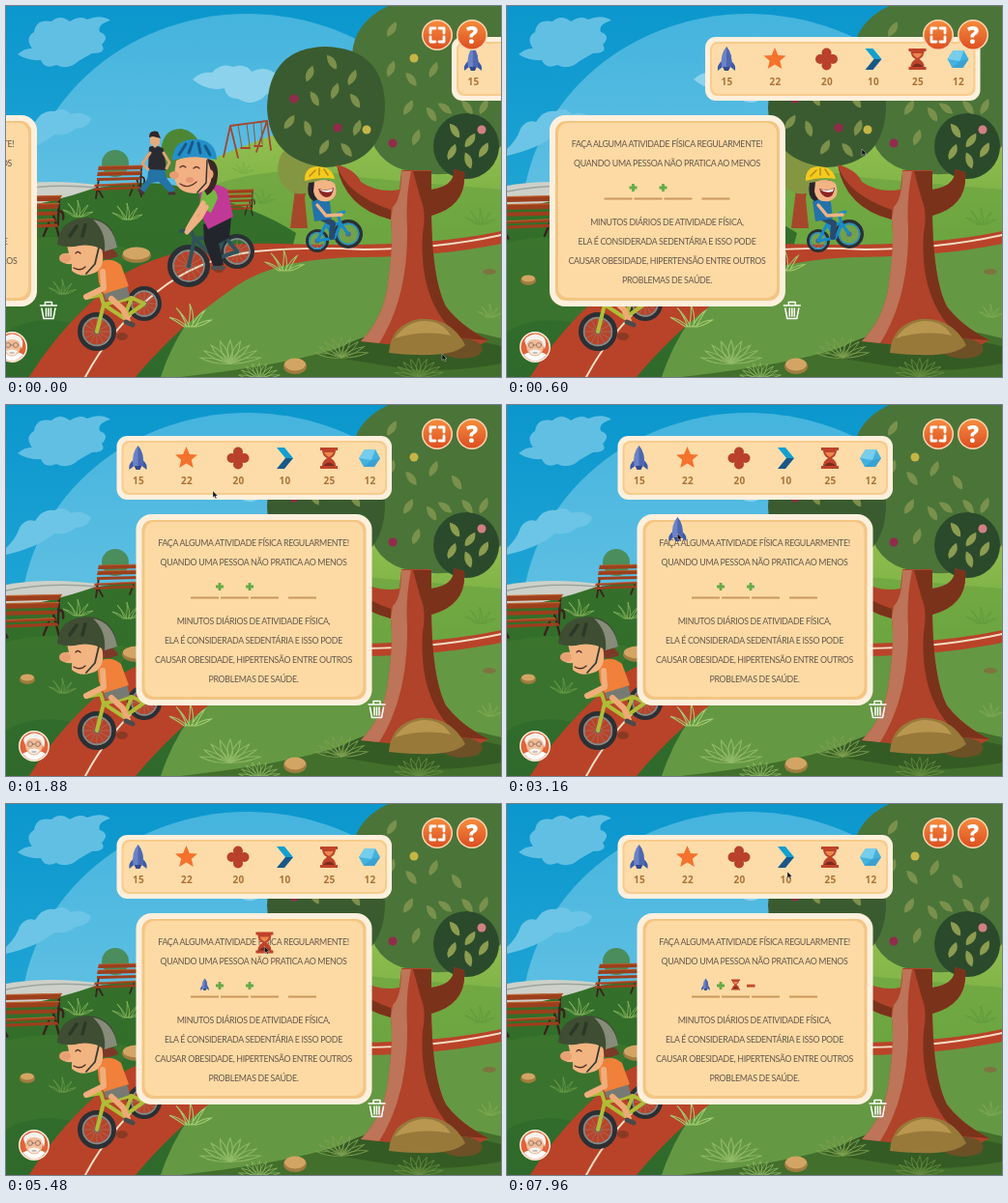
An HTML page that plays this animation: 512x384 px, repeating every 8 s.

```html
<!DOCTYPE html>
<html lang="pt">
<head>
<meta charset="utf-8">
<title>Atividade física</title>
<style>
html, body { margin: 0; width: 100%; height: 100%; overflow: hidden; background: #1095cf; }
svg { display: block; width: 100vw; height: 100vh; }
.copy { font: 8.8px Lato, sans-serif; letter-spacing: -.32px; fill: #66564c; text-anchor: middle; }
.count { font: 700 10px "Open Sans", sans-serif; letter-spacing: .3px; fill: #ad7236; text-anchor: middle; }
.line { fill: none; stroke-linecap: round; stroke-linejoin: round; }
</style>
</head>
<body>
<svg viewBox="0 0 512 384" preserveAspectRatio="none">
<defs>
  <linearGradient id="sky" x2="0" y2="1"><stop stop-color="#0b97cd"/><stop offset="1" stop-color="#22a5d6"/></linearGradient>
  <linearGradient id="glow" x2="0" y2="1"><stop stop-color="#45b4de"/><stop offset=".5" stop-color="#62c1e3"/></linearGradient>
  <linearGradient id="hill" x2="0" y2="1"><stop stop-color="#9cc652"/><stop offset="1" stop-color="#6ba540"/></linearGradient>
  <linearGradient id="field" x2="0" y2="1"><stop stop-color="#34702a"/><stop offset="1" stop-color="#2f6a2c"/></linearGradient>
  <linearGradient id="orange" x2="0" y2="1"><stop stop-color="#f58b3c"/><stop offset="1" stop-color="#dd4f22"/></linearGradient>
  <g id="bench">
    <path class="line" d="M6 15 3 35M45 14 50 33M50 3 49 24M4 23 10 34M42 22 38 32M49 13Q54 12 53 19" stroke="#3a231d" stroke-width="1.8"/>
    <path d="M6 2 52 1 50 5 5 6ZM5 8 50 7 49 11 4 12ZM4 14 49 13 48 16 4 17ZM2 21 46 19 48 21 1 23ZM1 24.5 48 22.5 50 25 0 27Z" fill="#9c3f1d"/>
    <path class="line" d="M6 2 52 1M5 8 50 7M2 21 46 19" stroke="#bd5f2d" stroke-width=".8"/>
  </g>
  <path id="tuft" d="M-2 0Q-8-6-15-7Q-8-3-4 0ZM-2 0Q-6-10-10-14Q-4-8 0 0ZM-1 0Q1-12 0-17Q4-8 2 0ZM1 0Q7-10 11-12Q6-4 4 0ZM3 0Q10-5 16-5Q10-1 5 0Z"/>
  <g id="rocket">
    <path d="M-5 2Q-10 6-9 12L-4 8ZM5 2Q10 6 9 12L4 8Z" fill="#3c59a6"/>
    <path d="M0-13Q-7-5-5 8H5Q7-5 0-13Z" fill="#6a83c6"/><path d="M0-13Q7-5 5 8H0Z" fill="#4f66b0"/>
    <path d="M-4 8H4L2 12H-2Z" fill="#34488c"/>
  </g>
  <path id="star" d="M0-12 3.4-4 11.5-3.6 5.3 1.8 7.3 10 0 5.5-7.3 10-5.3 1.8-11.5-3.6-3.4-4Z" fill="#f5722c"/>
  <g id="clover" fill="#b9412b"><circle cy="-6.5" r="5"/><circle cx="-6.5" r="5"/><circle cx="6.5" r="5"/><circle cy="6.5" r="5"/><path d="M-4.5-4.5H4.5V4.5H-4.5Z"/></g>
  <g id="arrow"><path d="M-8-11H0L9 0H1Z" fill="#11a0d0"/><path d="M-8 11H0L9 0H1Z" fill="#175889"/></g>
  <g id="glass"><path d="M-9-11H9V-8H7Q7-3 2 0Q7 3 7 8H9V11H-9V8H-7Q-7 3-2 0Q-7-3-7-8H-9Z" fill="#bf432a"/><path d="M-5-6H5Q3-2 0-1Q-3-2-5-6Z" fill="#e9894f"/><path d="M-6 8Q0 1 6 8Z" fill="#792b21"/></g>
  <g id="gem"><path d="M-5-9H6L11 0 5 9H-6L-11 0Z" fill="#43b2de"/><path d="M-5-9H6L2 2-11 0Z" fill="#77cdec"/><path d="M2 2 11 0 5 9-6 9Z" fill="#3aa2d2"/></g>
  <path id="plus" d="M-1.4-4H1.4V-1.4H4V1.4H1.4V4H-1.4V1.4H-4V-1.4H-1.4Z" fill="#65ab48"/>
</defs>

<path fill="url(#sky)" d="M0 0H512V220H0Z"/>
<ellipse cx="250" cy="225" rx="235" ry="217" fill="url(#glow)"/>
<g fill="#62bfe4">
  <path d="M12 50Q20 43 27 44Q19 33 29 27Q31 13 47 16Q56 8 66 16Q77 9 84 14Q98 8 108 15Q94 19 97 27Q108 31 99 40Q105 49 89 49Q80 54 75 57Q64 67 52 61Q40 66 36 56Q23 57 12 50Z"/>
  <path d="M0 148Q10 139 14 127Q20 117 30 120Q38 107 50 109Q60 104 67 112Q78 108 88 116Q86 126 72 127Q64 135 50 133Q34 147 0 155Z" fill="#6cc5e6"/>
  <path d="M193 76Q202 67 213 69Q222 58 235 63Q248 59 254 68Q268 61 280 71Q297 66 310 76Q301 83 288 82Q283 94 270 91Q256 106 240 96Q228 96 226 85Q208 89 193 76Z" fill="#8cd2ec"/>
</g>

<path d="M0 186Q45 178 100 186L70 202 0 214Z" fill="#cdd1c9"/>
<path class="line" d="M0 192Q45 183 94 188" stroke="#9da69e" stroke-width="1.5"/>
<circle cx="113" cy="163" r="14" fill="#4b8d5c"/>
<path d="M160 155Q160 127 181 127Q202 130 204 160L190 178H165Z" fill="#4d8735"/>
<path d="M190 170Q235 147 285 131Q390 88 512 110V260H150Z" fill="url(#hill)"/>
<path d="M210 187Q285 160 372 178L512 190V260H190Z" fill="#6ba441" opacity=".7"/>
<path d="M0 211Q50 203 90 189Q160 175 197 193Q265 211 300 235L260 384H0Z" fill="url(#field)"/>
<path d="M0 245Q60 230 130 252L75 330Q33 318 0 337Z" fill="#40792f" opacity=".6"/>
<path d="M160 384Q190 292 280 256Q410 250 512 241V384Z" fill="#659843"/>
<path d="M180 384Q290 372 350 352Q430 320 512 344V384Z" fill="#426f2b"/>
<path d="M24 384Q60 325 124 276Q182 243 282 246Q430 251 512 233V246Q444 260 360 260Q278 262 238 290Q178 331 134 384Z" fill="#b94329"/>
<path class="line" d="M82 384Q109 333 156 296Q199 261 258 254Q310 249 370 252Q450 251 512 237" stroke="#f5dfc6" stroke-width="2"/>
<g class="line" stroke="#a5452f" stroke-width="1.8"><path d="M232 124 270 119M225 156 232 124 240 157M259 151 270 119 274 149"/><path d="M240 123 244 147M249 122 252 146M256 121 258 145M264 121 265 143" stroke="#925443" stroke-width="1"/><path d="M243 147H252M257 145H265"/></g>
<use href="#bench" x="90" y="164"/>
<use href="#bench" transform="translate(-12 195)scale(1.34)"/>
<use href="#bench" transform="translate(222 189)scale(.66 .84)"/>
<g id="tufts" fill="none" stroke-width=".8"></g>
<g id="stones"></g>

<g id="walker">
  <path d="M148 166H163L166 178 175 190 170 194 158 182 150 183 143 193 138 190 146 179Z" fill="#2473a5"/>
  <path d="M148 146Q155 142 163 148L166 170 147 169Z" fill="#292b31"/>
  <path class="line" d="M149 152 141 163 147 169M163 152 169 162 166 168" stroke="#dba477" stroke-width="3"/>
  <path d="M149 133H159V143L154 147 149 142Z" fill="#e3ac80"/><path d="M148 136Q148 128 157 130L160 137 152 135Z" fill="#30252a"/>
  <path class="line" d="M138 191 142 194M169 194H174" stroke="#493234" stroke-width="3"/>
</g>

<path d="M294 230 299 190 294 180 300 182 303 192 312 180 309 199 312 230Z" fill="#a5482a"/>
<path d="M281 168Q283 142 305 146Q328 153 326 176Q321 197 300 194Q282 189 281 168Z" fill="#849642"/>

<g id="kid"></g>
<g id="woman"></g>
<g id="boy"></g>

<path d="M330 362Q374 335 420 333L512 352V370Q450 382 397 373Z" fill="#355b24"/>
<path d="M395 0Q360 17 358 50Q360 90 375 130Q385 170 430 173Q482 180 512 145V0Z" fill="#4b7439"/>
<path d="M270 105Q272 43 331 42Q390 44 392 102Q392 164 330 167Q272 160 270 105Z" fill="#3a5b30"/>
<ellipse cx="476" cy="145" rx="34" ry="34" fill="#2b4a2b"/>
<path d="M342 164Q361 169 367 182Q385 194 407 190L409 170H440L440 190Q465 186 463 169L474 172Q477 207 440 217Q441 284 455 311Q470 331 499 346L475 359 367 347Q391 322 395 287Q401 246 398 221Q350 209 342 164Z" fill="#b0432a"/>
<path d="M409 171H419Q413 200 415 230Q416 302 386 349L367 347Q391 322 395 287Q401 246 398 221L400 208Q409 200 409 171Z" fill="#bd7458"/>
<path d="M421 171H440V190Q465 186 463 169L474 172Q477 207 440 217Q441 284 455 311Q470 331 499 346L470 344Q426 308 431 235Q435 214 429 200Z" fill="#7b321b"/>
<path d="M342 164Q350 194 398 211V221Q350 209 342 164Z" fill="#7b321b"/>
<path d="M450 359Q465 338 486 347Q498 354 488 362Q468 369 450 359Z" fill="#6d5026"/>
<path d="M396 359Q398 330 427 324Q460 322 475 351Q460 366 396 359Z" fill="#98793a"/>
<path d="M402 344Q415 326 433 326Q451 326 460 341Q432 335 402 344Z" fill="#b99750"/>
<g id="leaves"></g>
<g id="ferns" fill="none" stroke-width=".7"></g>

<g id="avatar">
  <circle r="16" fill="#fff1df"/><circle r="14.5" fill="#e2633a"/>
  <path d="M-12 8Q-6 4 0 6Q7 4 12 8Q0 21-12 8Z" fill="#fff"/>
  <ellipse cy="-1" rx="9" ry="10.5" fill="#f2bc98"/>
  <path d="M-9-1Q-13-9-7-11Q0-16 8-11Q13-7 10 2L7-6Q0-10-7-6ZM-6 4Q0 1 6 4Q4 9 0 8Q-4 9-6 4Z" fill="#f5f2ed"/>
  <g class="line" stroke="#76615a" stroke-width=".7"><circle cx="-4" cy="-2" r="2.5"/><circle cx="4" cy="-2" r="2.5"/><path d="M-1-2H1M-2 6H2"/></g>
</g>

<g id="bar">
  <rect x="114.5" y="32" width="284.5" height="66" rx="11" fill="#fff0dd"/>
  <rect x="119.5" y="37" width="274.5" height="56" rx="8" fill="#f8cc8c"/>
  <rect x="121.5" y="39" width="270.5" height="52" rx="7" fill="#fddcaa"/>
  <g id="items"></g>
</g>
<g id="card">
  <rect x="134.5" y="113" width="244" height="198" rx="16" fill="#fff0dd"/>
  <rect x="140.5" y="119" width="232" height="186" rx="11" fill="#f4c583"/>
  <rect x="143.5" y="121" width="226" height="181" rx="10" fill="#fddaa4"/>
  <g id="copy" class="copy"></g>
  <path d="M191 199.5H220M222 199.5H251M253 199.5H282M292 199.5H321" stroke="#c9995f" stroke-width="2.2"/>
  <use href="#plus" x="221" y="188"/>
  <use id="sign" href="#plus" x="252" y="188"/>
  <path id="minus" d="M248 186.7H256.5V189.6H248Z" fill="#c64c2a"/>
  <use id="slotA" href="#rocket" transform="translate(205.5 187)scale(.5)"/>
  <use id="slotB" href="#glass" transform="translate(236.5 187)scale(.5)"/>
</g>
<path id="bin" class="line" d="M375 310H392M380 310V306.5H387V310M376.5 313 378.5 323.5H388.5L390.5 313M381 313V321M383.5 313V321M386 313V321" stroke="#fff" stroke-width="1.5"/>

<g id="buttons">
  <circle cx="446" cy="30" r="16" fill="#f9d8b5"/><circle cx="446" cy="30" r="14.5" fill="url(#orange)"/>
  <circle cx="482" cy="30" r="16" fill="#f9d8b5"/><circle cx="482" cy="30" r="14.5" fill="url(#orange)"/>
  <path class="line" d="M439 28V23H444M448 23H453V28M453 32V37H448M444 37H439V32" stroke="#fff" stroke-width="2.8"/>
  <text x="482" y="38.5" text-anchor="middle" fill="#fff" style="font:800 24px 'Open Sans',sans-serif">?</text>
</g>
<use id="drag"/>
<path id="cursor" d="M0 0V6.8L1.6 5.4 2.8 8 4 7.4 2.8 5H5Z" fill="#111" stroke="#fff" stroke-width=".35"/>
</svg>
<script>
const $ = id => document.getElementById(id);
const shape = (d, fill) => `<path d="${d}" fill="${fill}"/>`;
const stroke = (d, color, w = 2) => `<path class="line" d="${d}" stroke="${color}" stroke-width="${w}"/>`;
const oval = (x, y, rx, ry, fill) => `<ellipse cx="${x}" cy="${y}" rx="${rx}" ry="${ry}" fill="${fill}"/>`;
const ring = (x, y, r, color, w) => `<circle cx="${x}" cy="${y}" r="${r}" fill="none" stroke="${color}" stroke-width="${w}"/>`;

function wheel(x, y, r, rim = '#7f8b8c') {
  const tyre = r * .24;
  let spokes = '';
  for (let i = 0; i < 12; i++) {
    const a = i * Math.PI / 6;
    spokes += `M${x} ${y}l${r * .7 * Math.cos(a)} ${r * .7 * Math.sin(a)}`;
  }
  return stroke(spokes, '#8d8d88', .5) + ring(x, y, r - tyre / 2, '#2a3034', tyre) +
    ring(x, y, r - tyre - .8, rim, 1.6) + oval(x, y, 2.6, 2.6, '#56646a');
}

$('tufts').innerHTML = [[74, 218, 1, '#8fb860'], [125, 221, 1, '#8fb860'], [265, 204, .8, '#5f9a3d'],
  [190, 332, 1.4, '#a3cc70'], [287, 274, 1.3, '#a0c86a'], [245, 173, .7, '#75aa43'], [58, 298, .9, '#6f9f4c'],
  [490, 226, 1, '#5f9a3d'], [500, 322, .8, '#84ad55']].map(([x, y, s, c]) =>
  `<use href="#tuft" transform="translate(${x} ${y})scale(${s})" stroke="${c}"/>`).join('');

$('stones').innerHTML = [[135, 257, 15, 8], [22, 283, 8, 5], [299, 372, 12, 8]].map(([x, y, w, h]) =>
  oval(x, y + 1, w, h, '#a07c40') + oval(x, y - 1, w - 1, h - 1.5, '#d3a564')).join('') +
  oval(120, 342, 6, 4, '#8a3a24') + oval(220, 272, 6, 4, '#8a3a24') + oval(500, 275, 7, 3, '#7d7440');

$('kid').innerHTML = wheel(322, 243, 12, '#2a8fc4') + wheel(354, 236, 15, '#2a8fc4') +
  stroke('M322 243 331 226 346 225 354 236M331 226 340 240 346 225M340 240 322 243M346 225 343 215 350 213', '#168bc9', 3) +
  stroke('M326 219 338 225 337 239', '#274a6e', 6) +
  shape('M316 202Q327 196 335 203L337 220 319 223Z', '#2372ac') + stroke('M322 206 331 217 347 216', '#efb383', 3.5) +
  shape('M313 183Q310 197 318 202L337 194 334 180Z', '#29242a') +
  shape('M319 182Q332 177 340 184Q345 198 333 202Q320 204 318 192Z', '#f2b484') +
  shape('M323 189Q333 192 339 188Q338 198 331 198Q325 197 323 189Z', '#8b2526') +
  shape('M324 190Q333 192 338 189L337 192Q329 194 324 190Z', '#fff') +
  shape('M309 181Q308 167 322 166Q337 166 340 179Q325 176 309 181Z', '#f3ca1e') +
  stroke('M314 176 320 170M324 175 324 168M333 175 329 169', '#bb8d1b', 1.6);

$('woman').innerHTML = wheel(189, 269, 22) + wheel(239, 254, 18) +
  stroke('M189 269 195 241 226 238 239 254M195 241 217 262 226 238M217 262 239 254M195 241 191 232 181 233', '#2f5359', 4) +
  shape('M204 226 233 218 231 240 220 246 225 268 215 271 205 244Z', '#22262c') +
  stroke('M214 271H225', '#515154', 4) +
  shape('M200 190Q216 180 229 190L235 218 209 231 201 214Z', '#c13996') +
  shape('M203 192Q217 184 219 199L212 214 200 207Z', '#76b744') +
  stroke('M207 208 201 219 187 234M204 204 193 222 188 231', '#efb083', 5) +
  shape('M206 158Q220 158 219 176Q218 190 208 196L202 186Z', '#392826') +
  shape('M176 160Q192 152 208 158L213 174Q212 193 195 194Q174 193 174 174Z', '#f1b183') +
  oval(174, 175, 5, 4, '#e79c72') + oval(190, 180, 4, 3, '#e89577') + oval(211, 174, 3.5, 4.5, '#eaa679') +
  stroke('M180 167Q183 164 186 167M194 168Q197 165 200 168M180 184Q188 190 197 182', '#5b302b', 1.2) +
  stroke('M208 160 207 183 198 193', '#30353a', 1.5) +
  shape('M172 160Q173 138 195 138Q217 138 218 159Q193 153 172 160Z', '#258fc9') +
  stroke('M179 154 186 143M189 152 193 141M201 152 199 142M211 154 206 145', '#155986', 3);

$('boy').innerHTML = wheel(94, 337, 20) + wheel(143, 308, 18) +
  stroke('M94 337 101 309 130 302 143 308M101 309 122 323 130 302M122 323 143 308M101 309 98 299 83 302', '#afbd36', 4) +
  shape('M99 290 125 289 128 301 114 306 103 304Z', '#777a72') +
  stroke('M109 303 121 314 126 326', '#edaa76', 6) + stroke('M124 327 131 330', '#4a4b49', 5) +
  shape('M94 267Q107 258 119 268L127 290 101 298 96 286Z', '#f0803a') +
  stroke('M100 275 101 292 83 301', '#f0ae7c', 6) +
  shape('M96 250Q112 247 116 259L107 262 96 262Z', '#7c3826') +
  shape('M63 247Q83 241 99 251Q103 268 94 275Q78 283 68 274L68 267Q57 268 57 261Q58 255 65 256Z', '#f2b481') +
  oval(61, 261, 6, 5, '#e9a174') + stroke('M72 256Q74 253 77 256M70 271Q77 275 82 270', '#4e3028', 1.3) +
  stroke('M96 250 92 267 83 277', '#333e34', 1.8) +
  shape('M53 247Q55 220 84 219Q112 220 115 250L102 254Q91 246 76 248Q64 251 53 247Z', '#3f4d33') +
  shape('M90 221Q111 225 115 250L102 254Q104 234 90 221Z', '#868b7a') +
  stroke('M66 238 73 228M79 238 82 227', '#2c3828', 3.5);

const leaf = color => ([x, y, a]) =>
  `<path d="M0-9Q8-1 0 9Q-7 2 0-9Z" transform="translate(${x} ${y})rotate(${a})" fill="${color}"/>`;
const dot = color => ([x, y]) => oval(x, y, 4.5, 4.5, color);
$('leaves').innerHTML =
  [[314, 70, 20], [337, 58, -35], [358, 74, 25], [293, 120, 35], [319, 96, -30], [340, 88, 20], [361, 98, -35],
   [312, 127, -20], [329, 146, 30], [352, 149, -40], [363, 126, 20]].map(leaf('#7c8f4b')).join('') +
  [[399, 24, 30], [419, 76, -40], [398, 65, 20], [442, 66, 25], [466, 80, -35], [416, 105, 30], [440, 112, -35],
   [424, 136, 20], [454, 106, -55], [494, 104, 25], [477, 105, -40]].map(leaf('#7a914d')).join('') +
  [[464, 129, -35], [480, 139, 35], [461, 151, 25], [478, 160, -20], [494, 149, 30]].map(leaf('#8c9c50')).join('') +
  [[298, 96], [343, 126], [400, 142]].map(dot('#922b4c')).join('') +
  [[373, 128], [422, 54]].map(dot('#c5b546')).join('') + dot('#d28083')([492, 128]);

// Each fern is a fan of pointed leaves.
$('ferns').innerHTML = [[232, 370, 1.6, '#93bb68'], [347, 364, 1.4, '#7d9f50'], [427, 384, 1.3, '#668c40'],
  [262, 386, 1.1, '#93bb68']].map(([x, y, s, color]) => {
  let blades = '';
  for (let i = -4; i <= 4; i++)
    blades += `<path d="M0 0Q-4-10 0-20Q3-9 0 0Z" transform="rotate(${i * 19})"/>`;
  return `<g transform="translate(${x} ${y})scale(${s} ${s * .75})" stroke="${color}">${blades}</g>`;
}).join('');

$('items').innerHTML = [['rocket', 136.5, 15], ['star', 186.5, 22], ['clover', 240, 20], ['arrow', 288, 10],
  ['glass', 334, 25], ['gem', 376, 12]].map(([id, x, n]) =>
  `<use href="#${id}" x="${x}" y="55"/><text class="count" x="${x + .5}" y="82">${n}</text>`).join('');

$('copy').innerHTML = [['FAÇA ALGUMA ATIVIDADE FÍSICA REGULARMENTE!', 145.5], ['QUANDO UMA PESSOA NÃO PRATICA AO MENOS', 165.5],
  ['MINUTOS DIÁRIOS DE ATIVIDADE FÍSICA,', 226.5], ['ELA É CONSIDERADA SEDENTÁRIA E ISSO PODE', 246.5],
  ['CAUSAR OBESIDADE, HIPERTENSÃO ENTRE OUTROS', 266.5], ['PROBLEMAS DE SAÚDE.', 286.5]].map(([s, y]) =>
  `<text x="256" y="${y}">${s}</text>`).join('');

const LOOP = 8000, PICK_A = 2700, DROP_A = 3650, PICK_B = 4950, DROP_B = 5900, FLIP = 6720;
const trail = [[0, 451, 360], [80, 451, 360], [600, 367, 148], [920, 355, 151], [1880, 214, 89], [2500, 138, 62],
  [PICK_A, 138, 62], [3550, 206, 188], [DROP_A, 206, 188], [4560, 328, 75], [4800, 333, 60], [PICK_B, 333, 60],
  [5800, 237, 188], [DROP_B, 237, 188], [6350, 255, 188], [6900, 255, 188], [7900, 290, 70], [LOOP, 290, 70]];

function pointer(t) {
  const i = trail.findIndex(p => p[0] > t);
  const [t0, x0, y0] = trail[i - 1], [t1, x1, y1] = trail[i];
  const u = (t - t0) / (t1 - t0), k = u * u * (3 - 2 * u);
  return [x0 + (x1 - x0) * k, y0 + (y1 - y0) * k];
}
const place = (id, x, y = 0) => $(id).setAttribute('transform', `translate(${x} ${y})`);
const show = (id, on) => $(id).setAttribute('visibility', on ? 'visible' : 'hidden');
const settle = (t, end) => Math.max(0, 1 - t / end) ** 1.7;

function draw(t) {
  const slide = 347 * settle(t, 1100);
  place('bar', slide);
  place('card', -slide);
  place('bin', -slide * .98);
  place('avatar', 29 - 23 * settle(t, 500), 353);

  const [x, y] = pointer(t);
  place('cursor', x, y);
  const dragA = t >= PICK_A && t < DROP_A, dragB = t >= PICK_B && t < DROP_B;
  show('drag', dragA || dragB);
  $('drag').setAttribute('href', dragB ? '#glass' : '#rocket');
  place('drag', x, y - 4);
  show('slotA', t >= DROP_A);
  show('slotB', t >= DROP_B);
  show('sign', t < FLIP);
  show('minus', t >= FLIP);
}

const start = performance.now();
function tick() {
  draw((performance.now() - start) % LOOP);
  requestAnimationFrame(tick);
}
draw(0);
requestAnimationFrame(tick);
</script>
</body>
</html>
```
